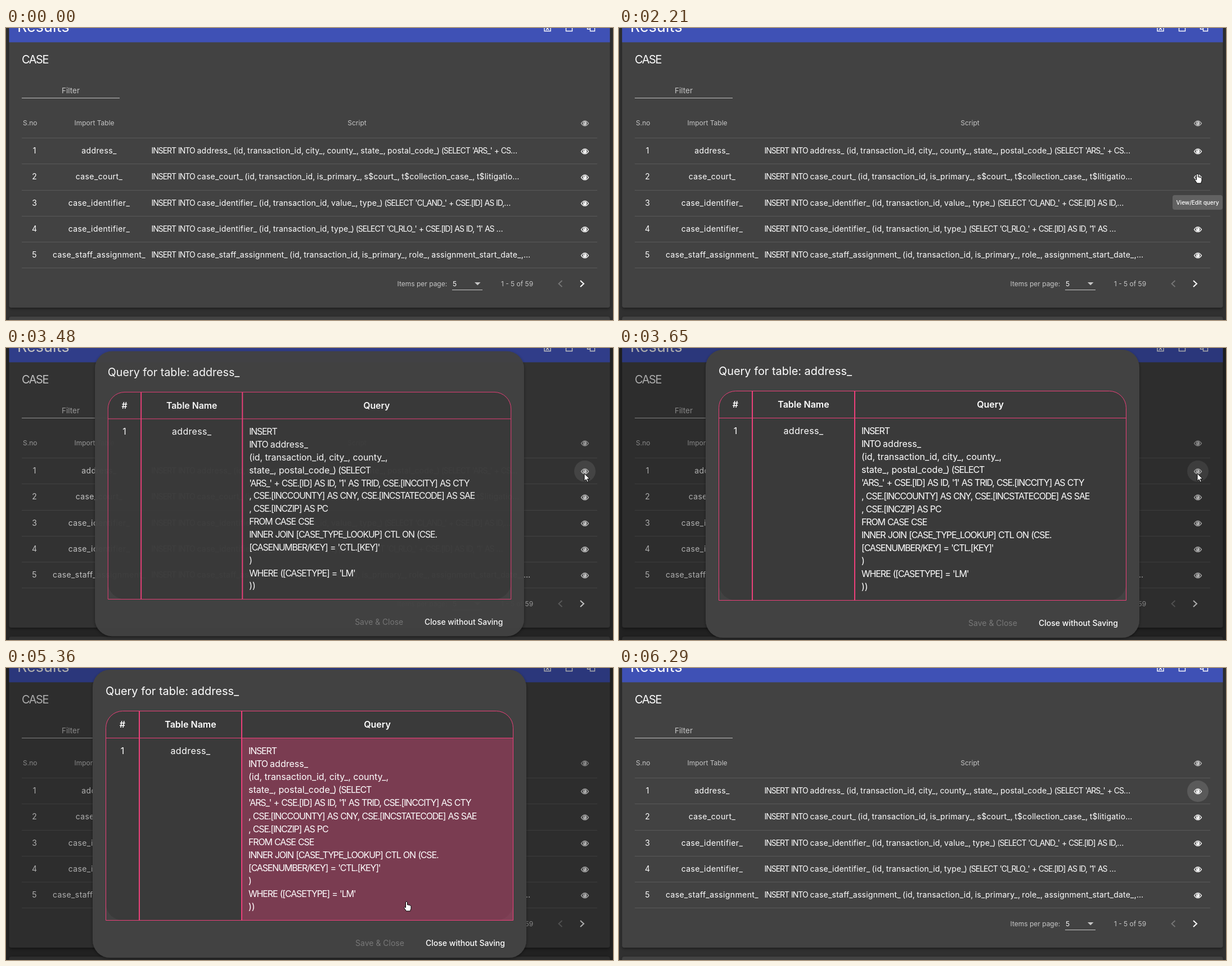
Recreate the animation shown at these times as an HTML page. Size 1079x519 px, loop 7050 ms.

```html
<!DOCTYPE html>
<html lang="en">
<head>
<meta charset="utf-8">
<title>Query results</title>
<style>
  html, body { margin: 0; width: 100%; height: 100%; overflow: hidden; background: #303030; }
  svg { display: block; width: 100%; height: 100%; font-family: Inter, sans-serif; fill: #fff; }
  .caps { letter-spacing: -.073em; word-spacing: 1px; }
  .cell { letter-spacing: .4px; }
  .script { letter-spacing: .23px; word-spacing: -1px; }
  .mid { text-anchor: middle; }
  .dim { fill: #c6c6c6; }
  .bold { font-weight: 600; }
  .medium { font-weight: 500; }
  .off { fill: #787878; }
  .line { fill: none; stroke: #fff; }
  .faint { stroke: #777; }
  .pink { fill: none; stroke: #ec407a; }
</style>
</head>
<body>
<svg id="stage" viewBox="0 0 1079 519" preserveAspectRatio="none"></svg>
<script>
const LOOP = 7050;
const ROW_STEP = 46.25;

const rows = [
  ["address_", "(id, transaction_id, city_, county_, state_, postal_code_) (SELECT 'ARS_' + CS…"],
  ["case_court_", "(id, transaction_id, is_primary_, s$court_, t$collection_case_, t$litigatio…"],
  ["case_identifier_", "(id, transaction_id, value_, type_) (SELECT 'CI_AND_' + CSE.[ID] AS ID,…"],
  ["case_identifier_", "(id, transaction_id, type_) (SELECT 'CI_RLO_' + CSE.[ID] AS ID, '1' AS …"],
  ["case_staff_assignment_", "(id, transaction_id, is_primary_, role_, assignment_start_date_,…"]
];

const query = [
  "INSERT",
  "INTO address_",
  "(id, transaction_id, city_, county_,",
  "state_, postal_code_) (SELECT",
  "'ARS_' + CSE.[ID] AS ID, '1' AS TRID, CSE.[INCCITY] AS CTY",
  ", CSE.[INCCOUNTY] AS CNY, CSE.[INCSTATECODE] AS SAE",
  ", CSE.[INCZIP] AS PC",
  "FROM CASE CSE",
  "INNER JOIN [CASE_TYPE_LOOKUP] CTL ON (CSE.",
  "[CASENUMBER/KEY] = 'CTL.[KEY]'",
  ")",
  "WHERE ([CASETYPE] = 'LM'",
  "))"
];

// Runs of capitals are set tighter than lower case.
const tighten = s => s.replace(/[^a-z]*[A-Z]{2}[^a-z]*/g, run => `<tspan class="caps">${run}</tspan>`);
const text = (x, y, size, s, cls = "") =>
  `<text x="${x}" y="${y}" font-size="${size}" class="${cls}">${tighten(s)}</text>`;
const rect = (x, y, w, h, fill, r = 0, extra = "") =>
  `<rect x="${x}" y="${y}" width="${w}" height="${h}" rx="${r}" fill="${fill}" ${extra}/>`;
const eye = (y, color) => `<g transform="translate(1029 ${y})">
  <path d="M-6.5 0Q-3.6-4.4 0-4.4T6.5 0Q3.6 4.4 0 4.4T-6.5 0Z" fill="none" stroke="${color}" stroke-width="1.3"/>
  <circle r="3.4" fill="${color}"/>
  <path d="M-1.7 0A1.7 1.7 0 0 1 0-1.7" fill="none" stroke="#424242" stroke-width=".8"/></g>`;

const tableRow = ([name, script], i) => {
  const y = 223 + i * ROW_STEP;
  return text(50.5, y, 14, String(i + 1), "mid") +
    text(165.5, y, 14, name, "mid cell") +
    text(258.5, y, 14, `INSERT INTO ${name} ${script}`, "script") +
    eye(y - 3.7, "#fff");
};

const rules = [0, 1, 2, 3, 4, 5].map(i =>
  rect(28, Math.round(195 + i * ROW_STEP), 1023, 1, "#595959")).join("");

const page = `
  ${rect(0, 0, 1079, 519, "#303030")}
  ${rect(5.5, -20, 1068, 517, "#424242", 4, 'filter="url(#shadow)"')}
  ${rect(5.5, 513, 1068, 30, "#424242", 4, 'filter="url(#shadow)"')}
  ${rect(5.5, 0, 1068, 25.4, "#3f51b5")}
  ${text(20, 7, 27, "Results")}
  <g class="line" stroke-width="1.4">
    <path d="M957-6V5.5H968V-6M960 3.5L965-2M960-2L965 3.5M995.5-6V5.5H1006.5V-6
      M1033.5-6V2H1038M1038.5-3V5.5H1046.5V-3Z"/>
  </g>
  ${text(28, 62.5, 20, "CASE")}
  ${text(115, 115.5, 13.5, "Filter", "mid dim")}
  ${rect(28, 124, 174, 1, "#c0c0c0")}
  ${text(30, 173, 12, "S.no", "dim")}
  ${text(157, 173, 12, "Import Table", "mid dim")}
  ${text(624, 173, 12, "Script", "mid dim")}
  ${eye(169.5, "#c6c6c6")}
  ${rules}
  <circle id="focus" cx="1029" cy="219" r="19" fill="#5a5a5a"/>
  ${rows.map(tableRow).join("")}
  ${text(695.5, 458.5, 12, "Items per page:", "dim")}
  ${text(794, 458.5, 12, "5")}
  ${rect(793, 465, 54, 1, "#c6c6c6")}
  <path d="M833 452h10.5l-5.25 5.2Z" class="dim"/>
  ${text(908.5, 458.5, 12, "1 - 5 of 59", "mid dim")}
  <path d="M988.5 449l-6 5.5 6 5.5" class="line faint" stroke-width="1.8"/>
  <path d="M1021 449l6 5.5-6 5.5" class="line" stroke-width="2"/>
  <g id="tooltip">${rect(-44.5, -13, 89, 26, "#616161", 4)}${text(0, 3.5, 10, "View/Edit query", "mid medium")}</g>`;

const dialog = `
  ${rect(154, 3, 771, 512, "#424242", 31, 'filter="url(#shadow)"')}
  ${text(177, 48, 19.9, "Query for table: address_")}
  ${rect(177.5, 76.5, 724, 372, "#3a3a3a", 30)}
  <rect id="hover" x="419" y="125" width="482" height="323" fill="#ec407a"/>
  <path class="pink" d="M177.5 448.5V106.5a30 30 0 0 1 30-30H871.5a30 30 0 0 1 30 30V448.5ZM177.5 124.5H901.5"/>
  <path class="pink" stroke-width="2" d="M237 77V448M419 77V448"/>
  ${text(207, 106, 16, "#", "mid bold")}
  ${text(328, 106, 16, "Table Name", "mid bold")}
  ${text(660, 106, 16, "Query", "mid bold")}
  ${text(207, 153, 16, "1", "mid")}
  ${text(328, 153, 16, "address_", "mid cell")}
  ${query.map((s, i) => text(431, 153 + i * 23.1, 16, s)).join("")}
  <g id="button">
    ${rect(731, 473, 171, 33, "#4b4b4b", 16.5)}
    <circle id="ripple" cx="813" cy="489" fill="#fff" fill-opacity=".09" clip-path="url(#pill)"/>
  </g>
  ${text(664.5, 494, 14, "Save &amp; Close", "mid off")}
  ${text(816.5, 494, 14, "Close without Saving", "mid medium")}`;

const stage = document.getElementById("stage");
stage.innerHTML = `
  <defs>
    <filter id="shadow" x="-10%" y="-10%" width="120%" height="120%">
      <feDropShadow dx="0" dy="2" stdDeviation="2.5" flood-opacity=".4"/>
    </filter>
    <clipPath id="pill">${rect(731, 473, 171, 33, "#fff", 16.5)}</clipPath>
  </defs>
  ${page}
  <rect id="backdrop" width="1079" height="519" fill="#000"/>
  <g id="dialog">${dialog}</g>
  <g id="cursor" stroke="#000" stroke-width="1" stroke-linejoin="round">
    <path id="arrow" d="M0 0V13.5L3.1 10.6 5.3 15.4 7.4 14.5 5.3 9.8H9.6Z"/>
    <path id="hand" d="M-1.5 1Q0-1 1.5 1V6Q3 5 4 6.5 5.5 5.7 6.3 7.2 8 6.8 8 8.5V12.5L6.5 17H-.5L-4.3 11.4Q-4.5 9-1.5 11Z"/>
  </g>`;

const el = Object.fromEntries(
  ["focus", "tooltip", "backdrop", "dialog", "hover", "button", "ripple", "cursor", "arrow", "hand"]
    .map(id => [id, document.getElementById(id)]));

// Pointer tip: time, x, y
const path = [
  [60, 800, 519], [190, 1018, 430], [330, 960, 240], [460, 700, 217], [560, 585, 290], [620, 563, 370],
  [770, 563, 370], [860, 553, 400], [950, 700, 438], [1100, 960, 400], [1200, 1043, 290],
  [1290, 1000, 175], [1350, 985, 163], [1450, 1020, 205], [1540, 1020, 205], [1870, 1028, 259],
  [2260, 1028, 259], [2830, 1028, 223], [3890, 1028, 223], [4100, 850, 260], [4320, 620, 240],
  [4550, 517, 219], [4620, 517, 219], [4770, 504, 197], [4910, 504, 197], [5360, 712, 415],
  [5420, 712, 415], [5580, 808, 492], [5650, 814, 491], [LOOP, 814, 491]
];

const ramp = (t, start, length) => Math.min(1, Math.max(0, (t - start) / length));
const easeOut = p => 1 - (1 - p) ** 3;
const within = (t, from, to) => t >= from && t < to;
const show = (node, on) => node.setAttribute("visibility", on ? "inherit" : "hidden");

function pointerAt(t) {
  const i = Math.max(1, path.findIndex(p => p[0] > t));
  const [t0, x0, y0] = path[i - 1], [t1, x1, y1] = path[i];
  const p = ramp(t, t0, t1 - t0);
  return [x0 + (x1 - x0) * p, y0 + (y1 - y0) * p];
}

function draw(t) {
  // The row button loses its highlight while the dialog is in use and gets it back on close.
  show(el.focus, within(t, 3230, 3890) || t >= 6000);

  const onSecondRow = t < 2550;
  const tip = onSecondRow
    ? easeOut(ramp(t, 1720, 150)) * (1 - ramp(t, 2400, 100))
    : easeOut(ramp(t, 2650, 150)) * (1 - ramp(t, 3390, 80));
  el.tooltip.setAttribute("transform", `translate(1028.5 ${onSecondRow ? 310 : 264}) scale(${tip > 0 ? .8 + .2 * tip : 0})`);
  el.tooltip.setAttribute("opacity", tip);

  const closing = ramp(t, 6000, 290);
  el.backdrop.setAttribute("opacity", .32 * easeOut(ramp(t, 3380, 270)) * (1 - easeOut(closing)));
  const opened = easeOut(ramp(t, 3380, 150));
  const scale = .7 + .3 * opened;
  el.dialog.setAttribute("opacity", opened * (1 - ramp(t, 6000, 110)));
  el.dialog.setAttribute("transform", `translate(539.5 259) scale(${scale}) translate(-539.5 -259)`);

  el.hover.setAttribute("opacity", .36 * ramp(t, 4060, 200) * (1 - ramp(t, 5430, 100)));
  show(el.button, t >= 5550);
  el.ripple.setAttribute("r", 102 * ramp(t, 5850, 240));

  const [x, y] = pointerAt(t);
  const pointing = within(t, 1700, 3230) || within(t, 4060, 5450) || t >= 5530;
  el.cursor.setAttribute("transform", `translate(${x} ${y})`);
  show(el.cursor, within(t, 60, 6200));
  show(el.hand, pointing);
  show(el.arrow, !pointing);
}

const start = performance.now();
function tick() {
  draw((performance.now() - start) % LOOP);
  requestAnimationFrame(tick);
}
tick();
</script>
</body>
</html>
```
